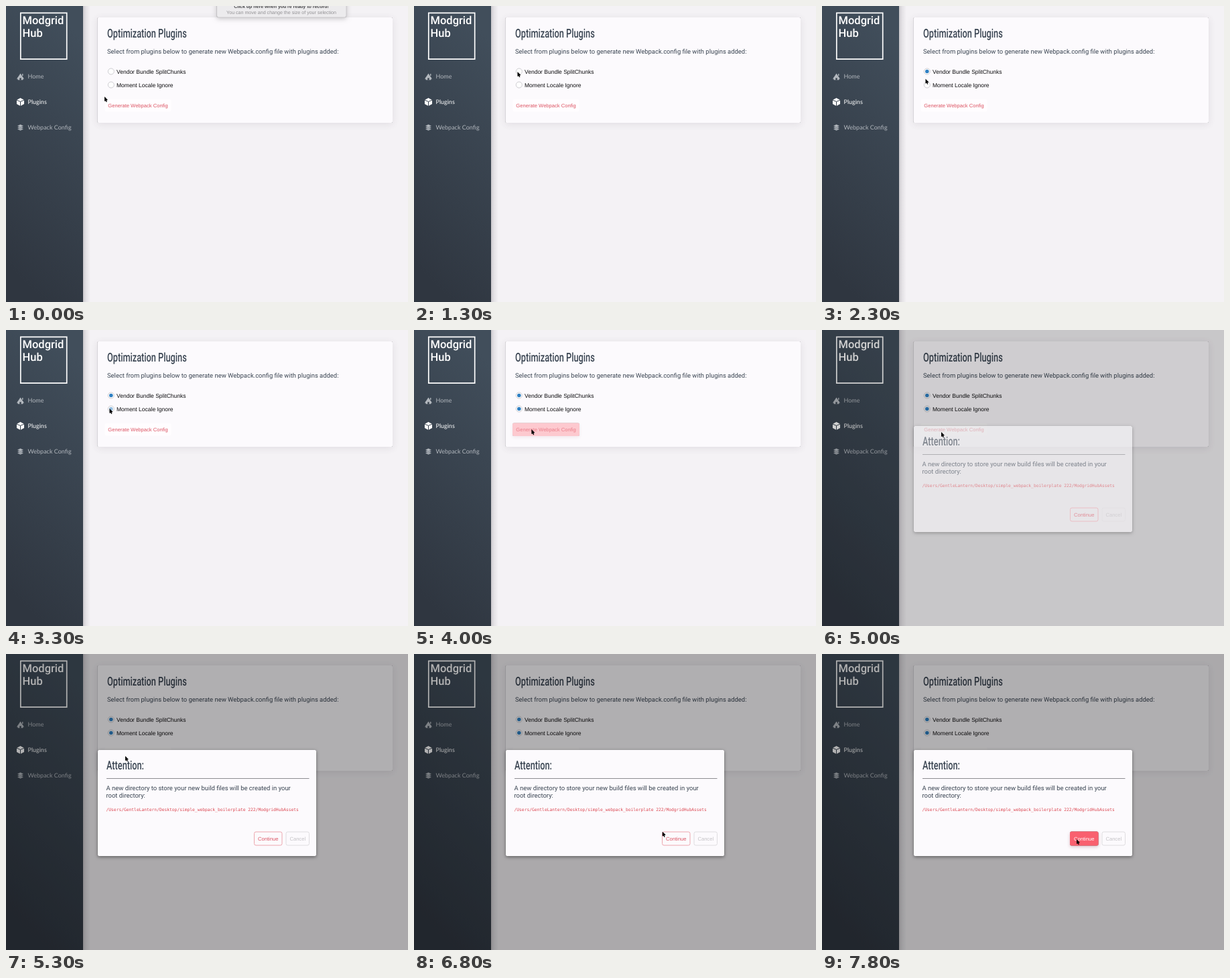
These frames come from a looping animation (600 px wide and 441 px high, 8000 ms). An HTML page with a canvas:

```html
<!DOCTYPE html>
<html lang="en">
<head>
<meta charset="utf-8">
<title>Optimization Plugins</title>
<style>
  html, body { margin: 0; width: 100%; height: 100%; overflow: hidden; background: #f4f2f5; }
  canvas { display: block; width: 600px; height: 441px; }
</style>
</head>
<body>
<canvas id="stage"></canvas>
<script>
const W = 600, H = 441, LOOP = 8000;
const canvas = document.getElementById('stage');
const ctx = canvas.getContext('2d');
const dpr = window.devicePixelRatio || 1;
canvas.width = W * dpr;
canvas.height = H * dpr;

const ROBOTO = 'Roboto, sans-serif';
const ARIAL = '"Liberation Sans", Arial, sans-serif';
const LATO = 'Lato, sans-serif';
const MONO = '"DejaVu Sans Mono", monospace';
const RED = '#f9606f', RED_TEXT = '#dc5362', INK = '#3a4552';
const SLATE = '#38424e', DIM = '#b3b8be';

const sample = t => Math.floor(t / 500) * 500 + (t % 500 >= 300 ? 250 : 0);
const ramp = (t, from, to) => Math.min(1, Math.max(0, (t - from) / (to - from)));
const easeOut = p => p * (2 - p);

// The pointer glides to each stop and rests there.
const stops = [
  { from: 0, to: 1000, x: 154.5, y: 98 },
  { from: 2000, to: 2750, x: 154.5, y: 117 },
  { from: 3500, to: 4250, x: 178, y: 152 },
  { from: 5500, to: 6000, x: 297, y: 174 },
  { from: 6250, to: 7000, x: 380, y: 276 }
];

function pointer(t) {
  let x = 147, y = 135;
  for (const stop of stops) {
    const p = easeOut(ramp(t, stop.from, stop.to));
    x += (stop.x - x) * p;
    y += (stop.y - y) * p;
  }
  return [x, y];
}

function text(str, x, y, size, family, color, weight = 400, align = 'left') {
  ctx.font = `${weight} ${size}px ${family}`;
  ctx.textAlign = align;
  ctx.fillStyle = color;
  ctx.fillText(str, x, y);
}

// Condensed display face shared by the headings.
function heading(str, x, y) {
  ctx.save();
  ctx.translate(x, y);
  ctx.scale(0.7, 1);
  text(str, 0, 0, 18.2, ROBOTO, INK, 500);
  ctx.restore();
}

function box(x, y, w, h, r, fill, stroke, line = 1) {
  ctx.beginPath();
  ctx.roundRect(x, y, w, h, r);
  if (fill) { ctx.fillStyle = fill; ctx.fill(); }
  if (stroke) { ctx.strokeStyle = stroke; ctx.lineWidth = line; ctx.stroke(); }
}

// A box whose shadow falls only outside it, so it can fade cleanly.
function raised(x, y, w, h, r, fill, shadow, blur, dy) {
  ctx.save();
  ctx.beginPath();
  ctx.rect(0, 0, W, H);
  ctx.roundRect(x, y, w, h, r);
  ctx.clip('evenodd');
  ctx.shadowColor = shadow;
  ctx.shadowBlur = blur * dpr;
  ctx.shadowOffsetY = dy * dpr;
  box(x, y, w, h, r, '#000');
  ctx.restore();
  box(x, y, w, h, r, fill);
}

function disc(x, y, r, fill, stroke) {
  box(x - r, y - r, 2 * r, 2 * r, r, fill, stroke, 0.7);
}

// Regular polygon with its first corner at the top.
function ngon(n, x, y, rx, ry, fill) {
  ctx.beginPath();
  for (let i = 0; i < n; i++) {
    const a = i * 2 * Math.PI / n;
    ctx.lineTo(x + rx * Math.sin(a), y - ry * Math.cos(a));
  }
  ctx.closePath();
  ctx.fillStyle = fill;
  ctx.fill();
}

function seam(width) {
  ctx.strokeStyle = SLATE;
  ctx.lineWidth = width;
  ctx.stroke();
}

function faded(alpha, draw) {
  if (!alpha) return;
  ctx.save();
  ctx.globalAlpha *= alpha;
  draw();
  ctx.restore();
}

function homeIcon(x, y) {
  ngon(3, x, y + 1, 6.3, 5.5, DIM);
  box(x - 3.9, y + 1, 7.8, 4.2, 0.5, DIM);
  box(x + 2.6, y - 4, 1.3, 3, 0, DIM);
  box(x - 1.2, y + 2.3, 2.4, 3, 0, SLATE);
}

function cubeIcon(x, y) {
  ngon(6, x, y, 6.4, 6, '#fff');
  ctx.beginPath();
  for (const [dx, dy] of [[-6, -3], [6, -3], [0, 6]]) {
    ctx.moveTo(x, y - 0.5);
    ctx.lineTo(x + dx, y + dy);
  }
  seam(1);
}

function layersIcon(x, y) {
  for (const dy of [2.4, 0, -2.4]) {
    ngon(4, x, y + dy, 4.8, 2.3, DIM);
    seam(0.5);
  }
}

function sidebar() {
  const edge = ctx.createLinearGradient(115, 0, 126, 0);
  edge.addColorStop(0, 'rgba(60,55,65,.22)');
  edge.addColorStop(0.4, 'rgba(60,55,65,.09)');
  edge.addColorStop(1, 'rgba(60,55,65,0)');
  ctx.fillStyle = edge;
  ctx.fillRect(115, 0, 11, H);

  const slate = ctx.createLinearGradient(-60, 325, 165, 100);
  slate.addColorStop(0, '#2f3640');
  slate.addColorStop(1, '#414e5b');
  ctx.fillStyle = slate;
  ctx.fillRect(0, 0, 115, H);

  box(21.8, 10.3, 68.9, 68.9, 0, null, '#fff', 1.7);
  text('Modgrid', 24.5, 27.2, 16.5, ROBOTO, '#fff', 500);
  text('Hub', 24.5, 45.5, 16.5, ROBOTO, '#fff', 500);

  const items = [['Home', homeIcon, DIM], ['Plugins', cubeIcon, '#fff'], ['Webpack Config', layersIcon, DIM]];
  items.forEach(([label, icon, color], i) => {
    const y = 105 + 38 * i;
    icon(21.5, y);
    text(label, 32.5, y + 3, 9, LATO, color);
  });
}

function radio(y, on, label) {
  disc(156.8, y, 4.5, '#fff', '#b9b8bd');
  faded(on, () => disc(156.8, y, 2.8, '#2f80c3'));
  text(label, 165, y + 3.1, 8.5, ARIAL, '#0b0b0d');
}

function button(x, y, w, h, label, color, hover, fill, border) {
  const write = c => text(label, x + w / 2, y + h / 2 + 2.9, 7.6, ARIAL, c, 400, 'center');
  box(x, y, w, h, 2.5, fill, border);
  write(color);
  faded(hover, () => {
    raised(x - 0.5, y - 0.5, w + 1, h + 1, 2.5, RED, 'rgba(120,40,60,.25)', 5, 2);
    write('#fff');
  });
}

function page(t) {
  ctx.fillStyle = '#f4f2f5';
  ctx.fillRect(0, 0, W, H);
  raised(136.5, 17, 440.5, 157, 2, '#fcfafd', 'rgba(70,60,80,.12)', 11, 2);
  heading('Optimization Plugins', 151, 46.6);
  text('Select from plugins below to generate new Webpack.config file with plugins added:',
    151, 70.8, 9.44, ROBOTO, INK);
  radio(97.5, ramp(t, 1750, 2000), 'Vendor Bundle SplitChunks');
  radio(117.5, ramp(t, 3000, 3500), 'Moment Locale Ignore');
  const hover = ramp(t, 3750, 4500) - ramp(t, 4750, 5000);
  button(147.5, 139, 99, 18.5, 'Generate Webpack Config', RED_TEXT, hover, '#fffdff');
  sidebar();
}

function prompt() {
  raised(314.5, -20, 193.5, 37, 3, '#ecebed', 'rgba(0,0,0,.22)', 7, 2);
  box(314.5, -20, 193.5, 37, 3, null, '#c3c1c5', 0.8);
  text("Click up here when you're ready to record!", 411, 3, 7, ARIAL, '#48484a', 700, 'center');
  text('You can move and change the size of your selection', 411, 11.7, 7.1, ARIAL, '#929194', 400, 'center');
}

function modal(hover) {
  raised(137, 143, 326, 158, 2, '#fcfafd', 'rgba(0,0,0,.45)', 5, 1.5);
  heading('Attention:', 150, 172.3);
  ctx.fillStyle = '#8d8c91';
  ctx.fillRect(150, 185, 302.5, 1);
  text('A new directory to store your new build files will be created in your', 149.5, 203, 9.45, ROBOTO, INK);
  text('root directory:', 149.5, 214, 9.45, ROBOTO, INK);
  text('/Users/GentleLantern/Desktop/simple_webpack_boilerplate 222/ModgridHubAssets',
    149.5, 233.6, 6.29, MONO, '#dc4650');
  button(370.5, 265, 41.5, 20, 'Continue', RED_TEXT, hover, null, '#eda6ae');
  button(418, 265, 34.5, 20, 'Cancel', '#c3c1c5', 0, null, '#dfdde0');
}

function cursor(x, y) {
  ctx.save();
  ctx.translate(x, y);
  ctx.strokeStyle = ctx.fillStyle = '#000';
  ctx.lineWidth = 1.3;
  ctx.beginPath();
  ctx.moveTo(1.5, 4);
  ctx.lineTo(3.3, 8);
  ctx.stroke();
  ctx.beginPath();
  ctx.lineTo(0, 0);
  ctx.lineTo(0, 6.9);
  ctx.lineTo(4.9, 4.9);
  ctx.fill();
  ctx.restore();
}

function draw(t) {
  ctx.setTransform(dpr, 0, 0, dpr, 0, 0);
  ctx.textRendering = 'geometricPrecision';
  page(t);
  faded(1 - easeOut(ramp(t, 0, 500)), prompt);
  const open = ramp(t, 4700, 5200);
  ctx.fillStyle = `rgba(0,0,0,${0.3 * open})`;
  ctx.fillRect(0, 0, W, H);
  faded(open, () => modal(ramp(t, 6750, 7500)));
  cursor(...pointer(t));
}

const start = performance.now();
function tick() {
  draw(sample((performance.now() - start) % LOOP));
  requestAnimationFrame(tick);
}
tick();
</script>
</body>
</html>
```
